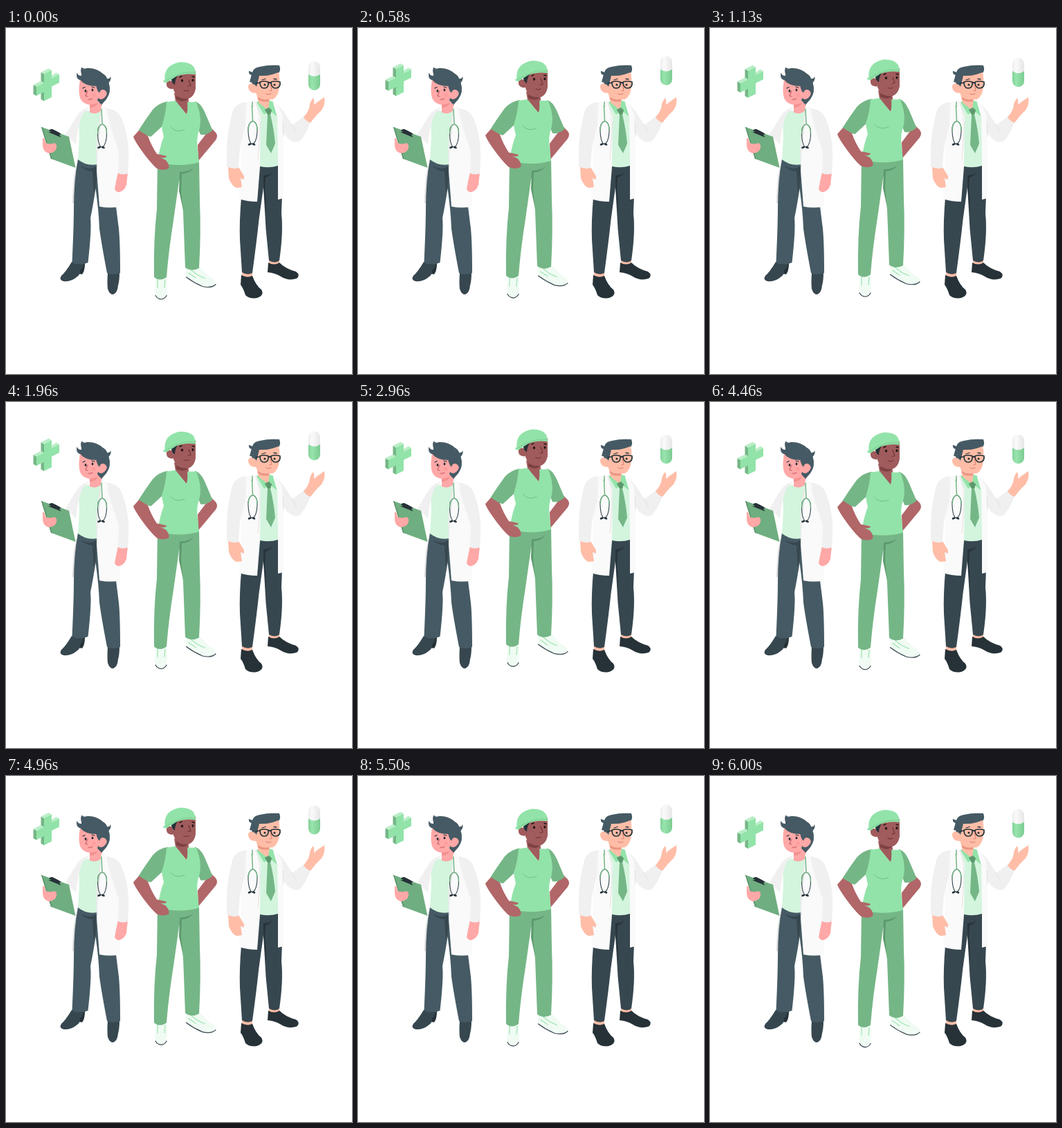
An HTML page for the animation above (6.04 s loop, 500 by 500 pixels).

```html
<!DOCTYPE html>
<html lang="en">
<head>
<meta charset="utf-8">
<title>Medical team</title>
<style>
html, body { margin: 0; height: 100%; overflow: hidden; background: #fff; }
svg { display: block; width: 100vw; height: 100vh; }
.line { fill: none; stroke-linecap: round; stroke-linejoin: round; }
.slate { fill: #455a64; } .deep { fill: #37474f; } .ink { fill: #263238; }
.mint { fill: #92e3a9; } .pale { fill: #d3f4dd; } .leaf { fill: #75b686; }
.coat { fill: #fafafa; } .fold { fill: #f0f0f0; }
.pink { fill: #ffa8a7; } .peach { fill: #ffbda7; } .brown { fill: #b16668; } .umber { fill: #a05b5c; }
</style>
</head>
<body>
<svg viewBox="0 0 500 500">
<defs>
  <linearGradient id="shell">
    <stop offset="0" stop-color="#ececec"/><stop offset=".3" stop-color="#fafafa"/><stop offset="1" stop-color="#e6e6e6"/>
  </linearGradient>
  <linearGradient id="dose">
    <stop offset="0" stop-color="#80cf96"/><stop offset=".3" stop-color="#98e5ae"/><stop offset="1" stop-color="#7ccb92"/>
  </linearGradient>
  <g id="scope" class="line">
    <path d="M139 139C133 141 132 147 132.500 154Q133 167 137 172M139 139C145 141 146 147 145.500 154Q145 167 140 172" stroke="#37474f" stroke-width="1.100"/>
    <path d="M138 117L139 139C135 140 133 144 132.600 152M139 139C143 140 145.500 144 145.500 152" stroke="#75b686" stroke-width="1.500"/>
    <path d="M133.500 173L136 172M141.500 173L139 172" stroke="#263238" stroke-width="2.600"/>
  </g>
</defs>

<g class="float">
  <path class="leaf" d="M39.500 82L44 84.500V98L39.500 95.500ZM50.500 64L55 66.500V80L50.500 77ZM50.500 94.500L55 92V105.500L50.500 103Z"/>
  <path fill="#b9eec7" d="M39.500 82L50.500 76.500L55 79L44 84.500ZM50.500 64L61.500 58.500L66 61L55 66.500ZM66 69L72.500 64.500L77 67L66 72.500Z"/>
  <path class="mint" d="M55 66.500L66 61V72.500L77 67V79L66 84.500V100L55 105.500V92L44 98V84.500L55 79Z"/>
</g>
<g class="float">
  <path fill="url(#shell)" d="M437 72V56.500A8.500 8.500 0 0 1 454 56.500V72Z"/>
  <path fill="url(#dose)" d="M437 67Q445.500 73 454 67V81.500A8.500 8.500 0 0 1 437 81.500Z"/>
</g>

<g id="clerk">
  <path fill="#e0e0e0" d="M104 188L98 215L95.500 253L99 254L106 205Z"/>
  <path class="ink" d="M107 340L105 355L110 356Q114 351 114 340Z"/>
  <path class="deep" d="M95 338Q86 353 80 358Q76 364 83 366Q94 367 102 360Q108 356 107 350Q112 347 112 338Z"/>
  <path class="deep" d="M147 353Q146 369 147 377Q150 386 155 385Q161 383 162 372Q164 365 164 353Z"/>
  <path class="slate" d="M104 190Q98 220 98 260Q98 285 95.500 339Q106 344 118.500 339Q124 290 122 275Q127 250 129.500 232Q134 263 135 290Q138 312 146 354Q155 358 165 354Q165 310 163 290L158 250L134 196Z"/>
  <path class="deep" d="M108 199Q115 207 125 207L127 238L130 226L131 199Q122 207 108 199Z"/>
  <path class="pale" d="M105 126Q110 118 121 120L137 118L138 140L132 197Q116 200 104 190L106 158Z"/>
  <path class="pink" d="M121 108L139 103L138 119Q130 126 121 122Z"/>
  <path fill="#f28f8f" d="M121 110L133 109Q128 115 121 115Z"/>
  <path class="fold" d="M122 114Q110 117 103 126L86 154L101 168Q103 148 107 135Q109 123 122 114Z"/>
  <path class="coat" d="M138 112Q150 116 158 124L163 170L165 258Q150 261 135 258L131 206L134 150Z"/>
  <path fill="#ebebeb" d="M138 112L144 117Q142 140 134 159L132 182L131 205Q129 175 132 151Z"/>
  <path class="coat" d="M138 113Q146 115 150 120L142 149L135 171Z"/>
  <path class="pink" d="M162 208L159 222L157 233Q160 238 164 237Q171 235 174 227L176 208Z"/>
  <path class="fold" d="M146 116Q161 118 167 130Q177 155 177.500 185L176 210Q169 213 162 210L163 178L152 145Q146 125 146 116Z"/>
  <path fill="#6fae80" d="M51 143L91 157L100.500 202L65 189Z"/>
  <path fill="#568e67" d="M51 143L52.500 143.500L66.500 189.500L65 189Z"/>
  <path class="ink" d="M61 150.500L65 150L62 148Q65 144.500 69 147L74 149.500L80 153L77 154L79.500 158Z"/>
  <path class="pink" d="M53 159Q56 158 57 166Q65 169 70 166Q74 168 73 173Q71 181 61 181Q53 178 53 169Z"/>
  <path class="slate" d="M109 66Q107 61 109.500 56.500Q112 60 117 58Q130 57 140 66Q145 69 146 73Q150 74 151 70Q153 74 148.500 79Q153 92 145 103L138 111L127 99L108 76Q100 73 102.500 64.500Q104 69 109 69Z"/>
  <path class="pink" d="M107 75Q114 84 131 84L135 94Q137 87 143 90Q149 94 142 101Q137 105 133 101Q132 111 121 111Q110 109 107 101Q104 91 107 75Z"/>
  <path class="slate" d="M106 73Q114 81 130 81.500Q131 89 134 93L138 88L138 74L112 66Z"/>
  <g fill="#263238"><ellipse cx="115" cy="91" rx="1.400" ry="1.900"/><ellipse cx="125" cy="89.500" rx="1.400" ry="1.900"/></g>
  <path class="line" stroke="#263238" stroke-width="1.200" d="M111 87L114 85.500M124 85L128 86"/>
  <path class="line" stroke="#ca5f66" stroke-width="1.100" d="M118 91L115 98L118 99M119 103Q122 104 125 102"/>
  <ellipse cx="127" cy="97" rx="3" ry="2.600" fill="#ff8f91" opacity=".4"/>
  <use href="#scope"/>
</g>

<g id="nurse">
  <path class="brown" d="M289 153L277 169L278 192L303 162Q307 156 303 151L297 145Z"/>
  <path fill="#f0fbf3" d="M217 360L215 383Q218 392 226 391Q231 389 233 379L232 360ZM260 345V359Q271 367 284 373Q297 376 303 370Q304 364 293 359L280 345Z"/>
  <path class="line" stroke="#37474f" stroke-width="1.200" d="M216 386.500Q219 392 225 392Q230 391 232 386.500M260.500 360Q271 368 284 373.500Q297 376.500 303 370.500"/>
  <path class="line" stroke="#92e3a9" stroke-width="1.300" stroke-dasharray="1.500 1.500" d="M219 364L219 375M230 364L229 375M268 350L277 357L288 362M264 354L274 361"/>
  <path class="leaf" d="M219 192L218 262Q213 305 214 360Q222 367 232 360Q235 322 242 278L250.500 218L256 266L259 346Q268 353 279 347Q282 295 280 250L279 191Z"/>
  <path fill="#5c9a6d" d="M251 208Q263 208 271 202Q265 210 254 211L253 235L256 263L250 235Z"/>
  <path class="leaf" d="M234 106Q221 108 212 118Q201 133 191.500 148Q201 156 209.500 157L229 139ZM273 106Q281 108 287 121L298.500 148Q289 156 281 154L273 134Z"/>
  <path class="umber" d="M243 94L245 106L261 125Q266 113 263 98Z"/>
  <path class="mint" d="M232 107L245 105L261 125Q263 117 262 107L275 107Q285 132 278 151Q275 161 277 176L279 194Q252 202 219 194Q222 172 228 157Q226 148 225 142Q231 124 232 107Z"/>
  <path class="line" stroke="#6fc186" stroke-width="1" d="M238 143Q245 152 258 147"/>
  <path class="brown" d="M192 148L184 157Q186 164 201 184Q211 197 218 203Q227 207 235 203Q237 198 231 191L223 187Q231 189 232 185Q224 183 218 182Q210 170 205 156Z"/>
  <path class="umber" d="M245 66L274 62L274 88Q272 99 264 102Q254 103 246 98L242 89Z"/>
  <path class="umber" d="M243 79Q235 73 232 79Q231 87 238 88Q242 89 245 86Z"/>
  <path class="ink" d="M237 72L250 66Q244 74 244 82Q240 80 239 75Z"/>
  <path fill="#7d4142" d="M246 98Q254 103 263 102Q257 109 246 103Z"/>
  <path class="mint" d="M230 79Q227 63 237 55Q250 46 264 51Q274 54 274 67Q258 65 246 70L232 79Z"/>
  <path class="mint" d="M232 77L228 75L227 78L231 79Z"/>
  <path class="line" stroke="#75c48b" stroke-width=".800" d="M231 76Q242 69 256 65Q267 63 274 65"/>
  <g fill="#211716"><ellipse cx="254.500" cy="76" rx="1.600" ry="2"/><ellipse cx="270" cy="75.500" rx="1.600" ry="2"/></g>
  <path class="line" stroke="#211716" stroke-width="1.500" d="M251 71L254 69.500M269 70L272 71"/>
  <path class="line" stroke="#703636" stroke-width="1.200" d="M264 75L267 83L263 84M257 90Q261 92 264 90"/>
</g>

<g id="doctor">
  <path class="peach" d="M341 350H356V360H341ZM380 333H395V343H380Z"/>
  <path class="ink" d="M340 357Q349 362 356 358Q361 372 369 378Q374 386 363 390Q352 392 346 386Q343 376 339 371ZM379 339Q388 344 395 339Q404 348 419 352Q426 357 420 362Q408 366 397 359Q389 354 378 353Z"/>
  <path class="deep" d="M367 198L340 245Q337 280 338 306L341 353Q349 358 356 354Q362 310 365.500 277L372 230L375.500 290L380 336Q389 341 395 336Q401 295 398 268L399 242L393 196Z"/>
  <path class="ink" d="M372 213Q379 213 385 209Q381 214 375 216L374 235Q376 250 376 270L372.500 235Z"/>
  <path class="pale" d="M362 109L388 108L394 130L393 199Q381 203 367 200L366 140Z"/>
  <path class="mint" d="M362 107L370 103L385 106Q391 112 392 128L381 119L373 125Z"/>
  <path class="peach" d="M361 91L365 108L379 119L381 102Z"/>
  <path fill="#eb9481" d="M364 100Q373 106 381 102L380 106Q370 108 364 103Z"/>
  <path class="leaf" d="M374 118L380 115L384 119L382 125Q387 145 389 167L383 181L376 169L378 125Z"/>
  <path fill="#5c9a6d" d="M374 118L380 115L384 119L382 125L378 125Z"/>
  <path class="fold" d="M386 108Q397 113 406 128L414 140L430 128Q437 130 440 136Q434 153 425 163Q417 168 407 159L397 146Z"/>
  <path class="coat" d="M386 108Q395 113 399 124L401 155V246L393 248V190L392 128Z"/>
  <path class="line" stroke="#e0e0e0" stroke-width="1" d="M400 137L401 156M413 140L419 150"/>
  <path class="peach" d="M430 129Q439 119 439 110Q441 104 444 101Q446 105 445 111Q452 105 460 100Q462 110 456 119Q448 126 440 137Q434 135 430 129Z"/>
  <path class="coat" d="M347 107L361 106L368 127L367 201L363 251Q349 251 337 247L340 185Q336 140 347 107Z"/>
  <path class="peach" d="M321 200L322 217Q327 230 334 231L341 230L339 217L344 219L344 214L336 201Z"/>
  <path class="fold" d="M347 107Q331 109 327 122Q319 152 319 180V200Q328 205 336 202L338 172L346 141Z"/>
  <path class="line" stroke="#e6e6e6" stroke-width="1.200" d="M361 107Q368 124 367 151L364 190"/>
  <use href="#scope" x="217.500" y="-4.500"/>
  <path class="line" stroke="#75b686" stroke-width="1.500" d="M356 107L356 114"/>
  <path class="slate" d="M355 68Q350 67 351 62L356 64Q358 57 367 56Q379 53 395 54Q398 62 393 66L366 73L362 91Q353 84 355 68Z"/>
  <path class="peach" d="M365 68Q381 69 394 64Q396 71 395 83Q395 97 386 103Q374 105 364 98L361 94Q350 94 350 84Q352 77 361 83L363 82Z"/>
  <path class="slate" d="M355 67L352 78Q358 78 362 85L366 69Q385 70 395 62L394 55L359 63Z"/>
  <path class="line" stroke="#263238" stroke-width="1.700" d="M361 80L367 79M367 78Q373 76 379 78Q380 87 373 87Q367 87 367 78M383 78Q389 76 396 78Q397 86 390 87Q383 87 383 78M379 80Q381 78 383 80"/>
  <g fill="#263238"><circle cx="374" cy="82" r="1.600"/><circle cx="388" cy="82" r="1.600"/></g>
  <path class="line" stroke="#263238" stroke-width="1.300" d="M370 75L375 73.500M387 73.500L391 74"/>
  <path class="line" stroke="#dd7f70" stroke-width="1.100" d="M382 81L384 90L381 91M376 95Q379 97 383 95"/>
</g>
</svg>
<script>
const LOOP = 6040;
const floats = document.querySelectorAll(".float");
const nurse = document.getElementById("nurse");

// Linear rise and fall: 0 to 1 and back within one period.
const bounce = (t, period) => 1 - Math.abs(1 - 2 * (t % period) / period);
const lift = (el, y) => el.setAttribute("transform", `translate(0 ${-y})`);

function draw(now) {
  const t = now % LOOP;
  lift(nurse, 10 * bounce(t, LOOP));
  floats.forEach(el => lift(el, 9.5 * bounce(t, LOOP / 4)));
  requestAnimationFrame(draw);
}
draw(performance.now());
</script>
</body>
</html>
```
